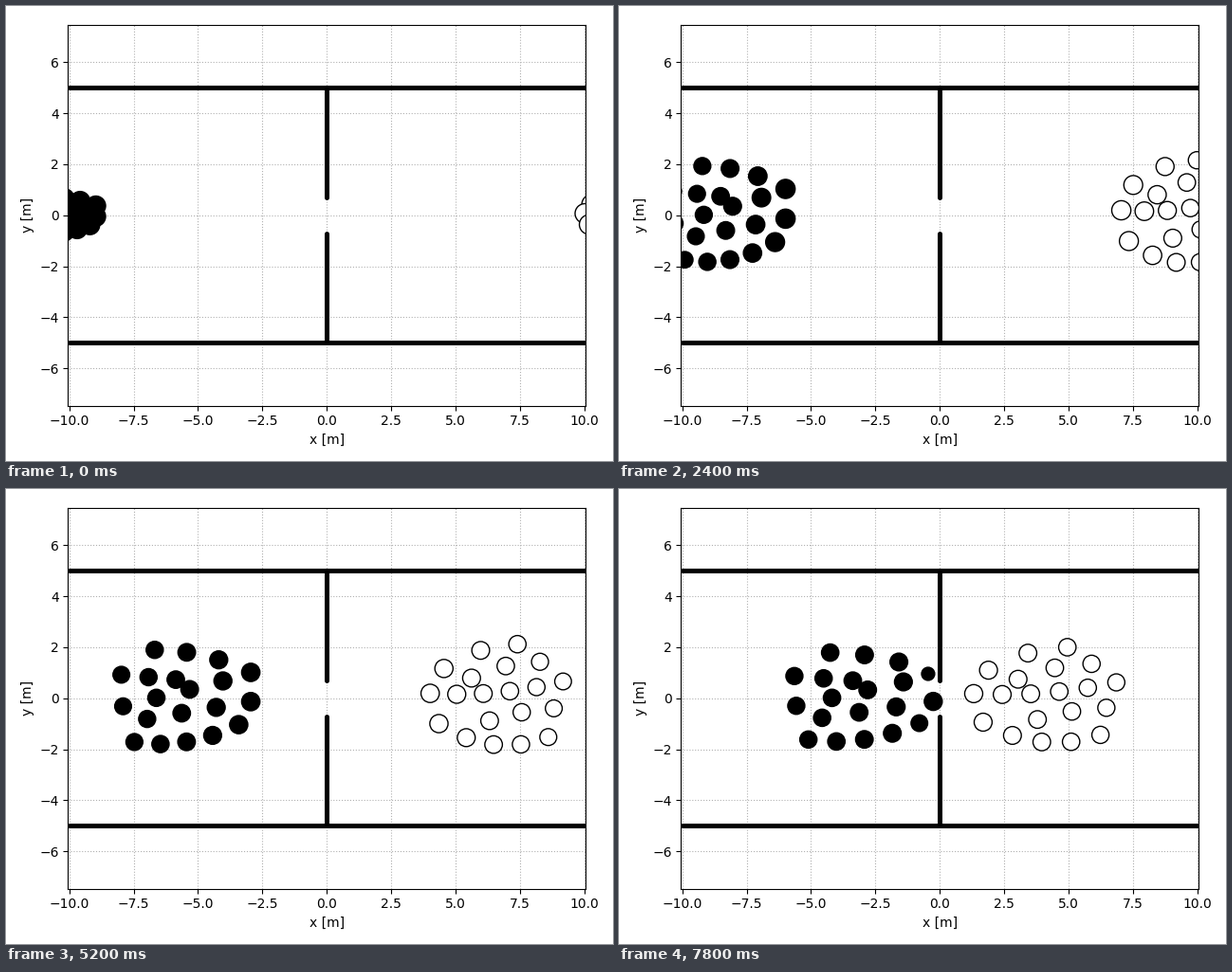
Animation of 640 by 480 pixels, one loop 8000 ms. Source, as a matplotlib script:

```python
import numpy as np
import matplotlib.pyplot as plt
from matplotlib.animation import FuncAnimation

FRAMES, STEP = 40, 200    # 8 s loop
PACE = 0.968              # walking speed, m/s
T_REF = 6                 # time at which the rows below are given, s
GAP = 0.7                 # half width of the door, m

# Rows of walkers: start x, y, end x, y, bow in y, count
LEFT = [(-5.94, 1.87, -2.11, 1.00, 0.22, 4),
        (-7.27, 0.91, -5.10, 0.72, 0, 3),
        (-7.20, -0.31, -3.22, 0.67, 0, 4),
        (-6.24, -0.80, -2.11, -0.13, 0, 4),
        (-6.75, -1.69, -2.59, -1.02, -0.33, 5)]

RIGHT = [(3.73, 1.15, 6.66, 2.09, 0.23, 3),
         (4.83, 0.78, 7.56, 1.41, 0.15, 3),
         (3.18, 0.19, 8.48, 0.65, -0.2, 6),
         (5.55, -0.87, 8.11, -0.39, 0.09, 3),
         (3.53, -0.98, 7.89, -1.50, -0.55, 5)]


def line_up(rows):
    points = []
    for x0, y0, x1, y1, bow, n in rows:
        s = np.linspace(0, 1, n)
        points.append(np.c_[x0 + (x1 - x0) * s,
                            y0 + (y1 - y0) * s + 4 * bow * s * (1 - s)])
    return np.vstack(points)


def brake(dist):
    """Ease the distance to the wall so that nobody walks into it."""
    return 0.3 + 0.25 * np.log1p(np.exp((dist - 0.3) / 0.25))


class Crowd:
    def __init__(self, ax, rows, centre, heading, color):
        x, self.y = line_up(rows).T
        self.ahead = heading * (x - centre)    # lead over the crowd's centre
        self.centre, self.heading = centre, heading
        self.dots = ax.scatter(x, self.y, c=color, edgecolors='k',
                               linewidths=1, zorder=3)

    def place(self, t):
        burst = np.exp(-1.5 * t)               # the dense start bursts apart
        stretch = 1.163 - 0.485 * np.exp(-t / 5.5)
        lead = self.ahead * stretch - 0.2 * burst * (self.ahead - 1.47)
        y = self.y * (1.06 - 0.0017 * t ** 2 - 0.69 * burst)
        dist = -self.heading * self.centre - PACE * (t - T_REF) - lead
        dist = np.where(np.abs(y) > GAP, brake(dist), dist)
        return np.c_[-self.heading * dist, y]

    def draw(self, t):
        step = (self.place(t + 0.05) - self.place(t - 0.05)) / 0.1
        speed = np.hypot(*step.T) + np.exp(-1.5 * t)
        radius = 5.5 + 4.6 * np.clip(speed, 0.4, 1.2)   # pixels, with edge
        self.dots.set_offsets(self.place(t))
        self.dots.set_sizes(((2 * radius - 1.4) * 0.72) ** 2)


fig, ax = plt.subplots(figsize=(6.4, 4.8), dpi=100)
wall = dict(color='k', lw=3.6, solid_capstyle='round', zorder=2)
for side in (-1, 1):
    ax.plot([-10, 10], [5 * side] * 2, **wall)
    ax.plot([0, 0], [GAP * side, 5 * side], **wall)
ax.grid(linestyle=':')
ax.set_xlabel('x [m]')
ax.set_ylabel('y [m]')

crowds = [Crowd(ax, LEFT, -4.69, 1, 'k'), Crowd(ax, RIGHT, 5.74, -1, 'w')]

ax.set_xlim(-10.05, 10.05)
ax.set_ylim(-7.463, 7.463)
fig.tight_layout()
fig.subplots_adjust(left=65.4 / 640, top=460.2 / 480)


def update(i):
    for crowd in crowds:
        crowd.draw(i * STEP / 1000)
    return [crowd.dots for crowd in crowds]


anim = FuncAnimation(fig, update, frames=FRAMES, interval=STEP,
                     repeat=True, repeat_delay=0)
plt.show()
```
